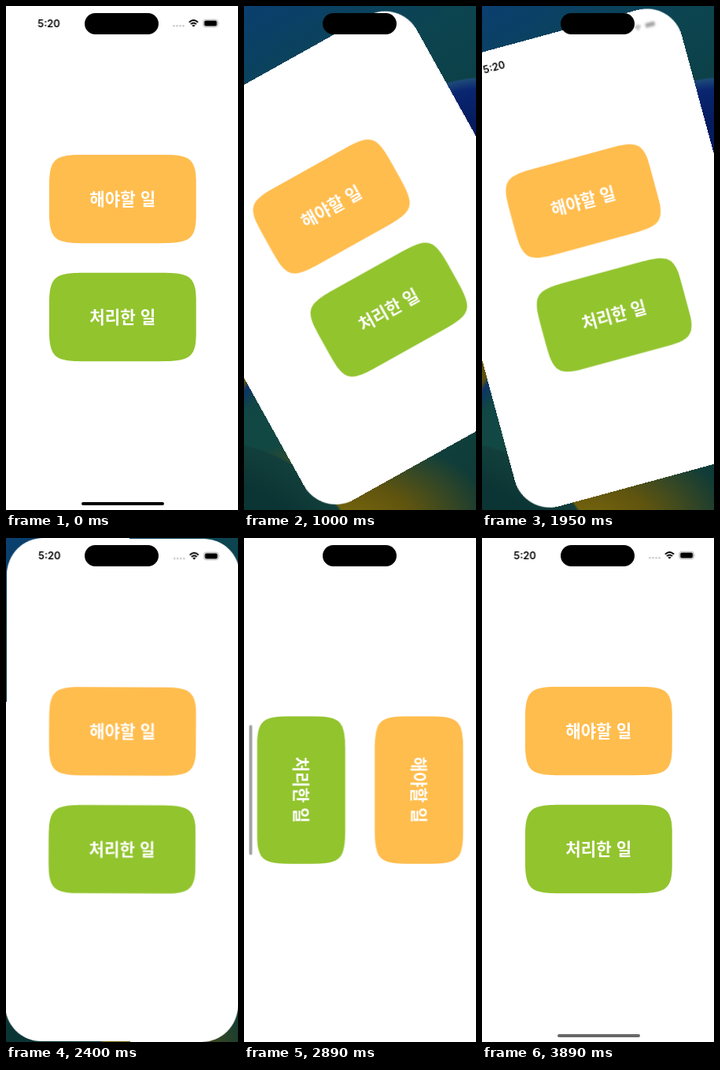
An HTML page for the animation above (3.91 s loop, 295 by 640 pixels).

```html
<!DOCTYPE html>
<html lang="ko">
<head>
<meta charset="utf-8">
<title>화면 회전</title>
<style>
html, body { margin: 0; width: 100%; height: 100%; overflow: hidden; background: #fff; }
#stage { position: relative; width: 295px; height: 640px; overflow: hidden; background: #fff; }
#stage * { position: absolute; }
.loop, #wall { animation: 3910ms linear infinite; }

#wall {
  inset: 0;
  animation-name: wall;
  animation-timing-function: step-end;
  background:
    radial-gradient(circle at 305px 250px, #051c60 0 105px, #0a2670 145px, #1d4a78 158px, transparent 160px),
    radial-gradient(circle at -42px 753px, #0b3534 0 150px, #123f3c 198px, transparent 201px),
    radial-gradient(ellipse 190px 110px at 130px 655px, #7a680c, #5f540f 45%, transparent),
    radial-gradient(circle at -70px 430px, #6c5d0a 0 60px, #5d520f 85px, #0d3566 92px, transparent 110px),
    linear-gradient(150deg, #0a3f70, #0c4450 20%, #0c3f44 38%, #124844 70%, #0e3835);
}
#sheet {
  left: 50%; top: 50%; width: 295px; height: 640px;
  translate: -50% -50%;
  border-radius: 46px;
  background: #fff;
  animation-name: turn;
  animation-timing-function: ease-in-out;
}
#buttons { left: 50%; top: 50%; width: 187.5px; height: 262.5px; translate: -50% -50%; }
#buttons text {
  font: 700 21.2px "Noto Sans CJK KR", "Noto Sans CJK", sans-serif;
  fill: #fff; text-anchor: middle;
}
#status { left: 0; top: 0; width: 295px; height: 44px; animation-name: anchor; animation-timing-function: ease-in-out; }
#clock { animation-name: clock; font: 600 12.8px Inter, sans-serif; }
#icons { animation-name: icons; transform-origin: 260px 22px; }
#home {
  left: 50%; bottom: 6px; width: 105px; height: 4px;
  translate: -50% 0; border-radius: 2px; background: #000;
  animation-name: home;
}
#island { left: 100.3px; top: 8.5px; width: 94.2px; height: 27.5px; border-radius: 14px; background: #000; }

/* Backdrop shows only while the sheet is turning. */
@keyframes wall {
  0%, 31.714%, 52.813%, 71.253%, 91.56%, 100% { opacity: 0; }
  21.611%, 42.583%, 61.023%, 81.33% { opacity: 1; }
}
@keyframes turn {
  0%, 21.611%, 52.813%, 61.023%, 91.56%, 100% { width: 295px; height: 640px; rotate: 0deg; }
  31.714%, 42.583% { width: 640px; height: 295px; rotate: -90deg; }
  71.253%, 81.33% { width: 640px; height: 295px; rotate: 90deg; }
}
/* Keeps the status bar on the right edge during left turns. */
@keyframes anchor {
  0%, 21.611%, 52.813%, 100% { left: 0; }
  31.714%, 42.583% { left: 345px; }
}
@keyframes clock {
  0%, 22.379%, 49.207%, 61.688%, 87.724%, 100% { opacity: 1; }
  25.448%, 46.65%, 64.757%, 85.166% { opacity: 0; }
}
@keyframes icons {
  0%, 22.379%, 54.322%, 61.688%, 92.839%, 100% { opacity: 1; filter: blur(0); scale: 1; }
  25.448%, 47.417%, 64.757%, 85.934% { opacity: 0; filter: blur(2.2px); scale: .6; }
}
@keyframes home {
  0%, 21.611% { opacity: 1; width: 105px; }
  21.612%, 31.458% { opacity: 0; width: 165px; }
  38.875%, 42.583% { opacity: 1; width: 165px; }
  42.584%, 56.01% { opacity: 0; width: 105px; }
  61.023% { opacity: .66; width: 105px; }
  61.024%, 71.253% { opacity: 0; width: 165px; }
  78.568%, 81.33% { opacity: 1; width: 165px; }
  81.331%, 95.141% { opacity: 0; width: 105px; }
  100% { opacity: .655; width: 105px; }
}
</style>
</head>
<body>
<div id="stage">
  <div id="wall"></div>
  <div id="sheet" class="loop">
    <svg id="buttons" viewBox="0 0 187.5 262.5">
      <defs>
        <path id="card" d="M46 0H141.5C182.5 0 187.5 5 187.5 46V66.5C187.5 107.5 182.5 112.5 141.5 112.5H46C5 112.5 0 107.5 0 66.5V46C0 5 5 0 46 0Z"/>
      </defs>
      <use href="#card" fill="#ffbd4e"/>
      <text x="93.5" y="64.4">해야할 일</text>
      <use href="#card" y="150" fill="#92c42e"/>
      <text x="93.5" y="214.4">처리한 일</text>
    </svg>
    <svg id="status" class="loop" viewBox="0 0 295 44">
      <text id="clock" class="loop" x="39.8" y="26.7">5:20</text>
      <g id="icons" class="loop">
        <path d="M213 25.3h12.1" stroke="#c4c4c6" stroke-width="2.5" stroke-linecap="round" stroke-dasharray="0 4"/>
        <g fill="none" stroke="#000" stroke-width="1.9">
          <path d="M232.5 20.7Q238 15.5 243.5 20.7"/>
          <path d="M234.6 23.1Q238 19.9 241.4 23.1"/>
        </g>
        <path d="M236 24.6Q238 22.9 240 24.6L238 26.7Z"/>
        <rect x="250.3" y="17.2" width="18.6" height="9.6" rx="3" fill="none" stroke="#a8a8a8" stroke-width=".8"/>
        <rect x="251.6" y="18.5" width="16" height="7" rx="1.9"/>
        <path d="M269.9 20.6q1.2 1.4 0 2.8z" fill="#a8a8a8"/>
      </g>
    </svg>
    <div id="home" class="loop"></div>
  </div>
  <div id="island"></div>
</div>
</body>
</html>
```
